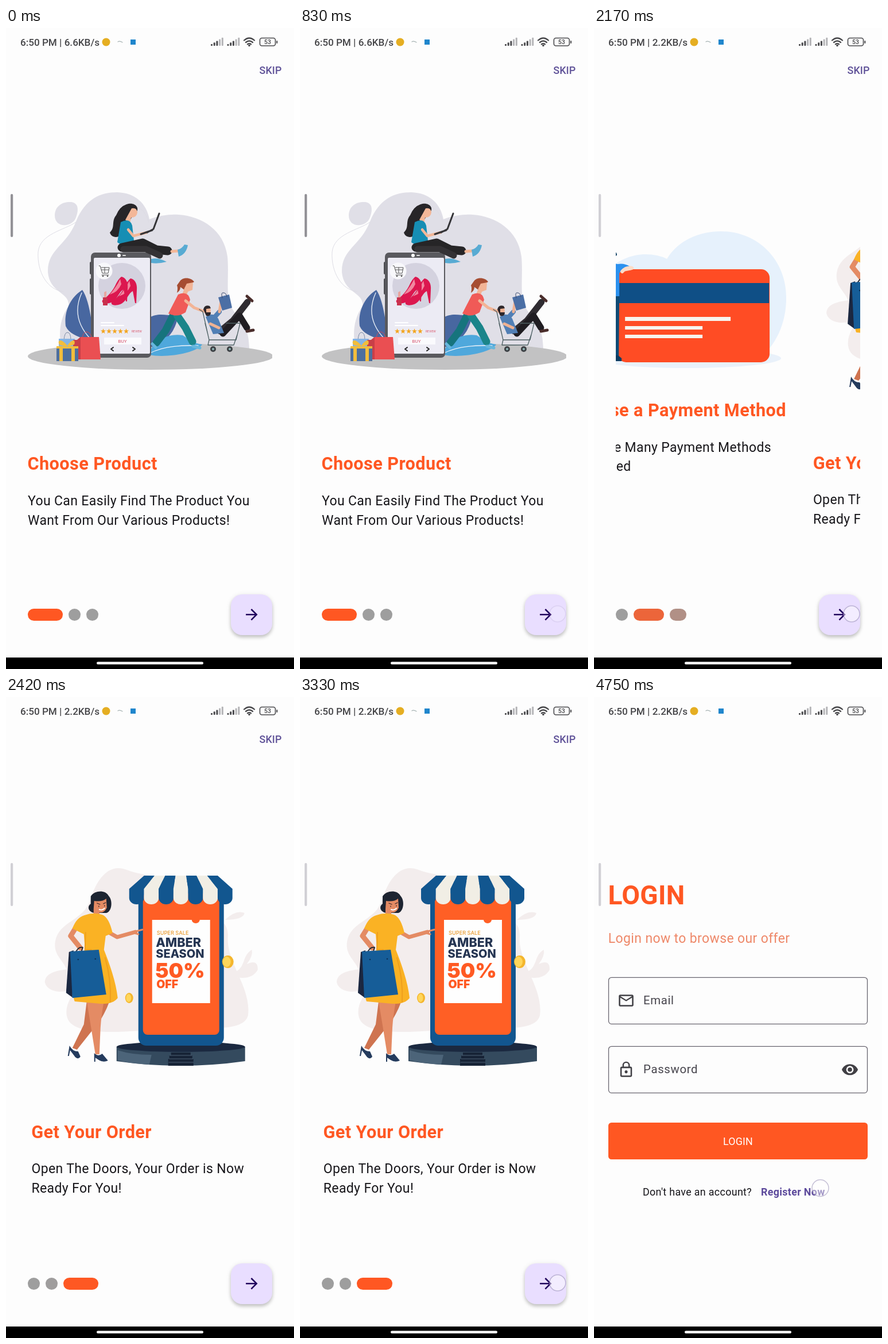
These frames come from a looping animation (502x1116 px, 4.83 s). An HTML page:

```html
<!DOCTYPE html>
<html lang="en">
<head>
<meta charset="utf-8">
<title>Shop onboarding</title>
<style>
  html, body { margin: 0; width: 100%; height: 100%; overflow: hidden; background: #fdfdfd; }
  #stage { position: relative; width: 502px; height: 1116px; overflow: hidden; background: #fdfdfd; }
  .layer, svg.full { position: absolute; left: 0; top: 0; width: 502px; height: 1116px; }
  svg { display: block; font-family: Roboto, sans-serif; }
  .layer, .anim { animation: 4830ms linear infinite; }
  .title { font-size: 30.7px; font-weight: 700; letter-spacing: .4px; fill: #ff5722; }
  .body { font-size: 23px; letter-spacing: .36px; fill: #17161a; }
  .small { font-size: 17.9px; }
  .label { font-size: 20.4px; letter-spacing: .64px; fill: #47454d; }
  .line { fill: none; stroke-linecap: round; stroke-linejoin: round; }
  .poster { font-family: Inter, sans-serif; font-weight: 800; fill: #253552; }

  #track { animation-name: slide; animation-timing-function: ease-in-out; }
  @keyframes slide {
    0%, 18.63% { transform: translateX(0); }
    26.92%, 42.4% { transform: translateX(-425px); }
    50.68%, 100% { transform: translateX(-850px); }
  }
  #dots { position: absolute; left: 38px; top: 1011px; display: flex; gap: 10.2px; }
  #dots i { width: 20.5px; height: 20.5px; border-radius: 11px; background: #9e9e9e; animation-timing-function: ease-in-out; }
  #dots i:nth-child(1) { animation-name: dot1; }
  #dots i:nth-child(2) { animation-name: dot2; }
  #dots i:nth-child(3) { animation-name: dot3; }
  @keyframes dot1 {
    0%, 18.63% { width: 61.3px; background: #ff5722; }
    26.92%, 100% { width: 20.5px; background: #9e9e9e; }
  }
  @keyframes dot2 {
    0%, 18.63%, 50.68%, 100% { width: 20.5px; background: #9e9e9e; }
    26.92%, 42.4% { width: 61.3px; background: #ff5722; }
  }
  @keyframes dot3 {
    0%, 42.4% { width: 20.5px; background: #9e9e9e; }
    50.68%, 100% { width: 61.3px; background: #ff5722; }
  }
  #fab { position: absolute; left: 392px; top: 986px; width: 72px; height: 71px; border-radius: 20px;
    background: #e9deff; box-shadow: 0 4px 6px rgba(0,0,0,.2), 0 1px 10px rgba(0,0,0,.09); }
  #fab svg { position: absolute; left: 20.5px; top: 20px; width: 30.7px; height: 30.7px; fill: #21005d; }

  #intro { animation-name: leave; }
  @keyframes leave {
    0%, 69.15% { transform: scale(1); visibility: visible; animation-timing-function: ease-out; }
    75.36% { transform: scale(1.05); visibility: visible; }
    75.4%, 100% { transform: scale(1.05); visibility: hidden; }
  }
  #login { animation-name: enter; background: #fdfdfd; }
  @keyframes enter {
    0%, 69.15% { opacity: 0; transform: scale(.85); animation-timing-function: ease-out; }
    70.7% { opacity: 1; transform: scale(.92); animation-timing-function: ease-out; }
    75.36%, 100% { opacity: 1; transform: scale(1); }
  }
  #fast { animation-name: early; }
  #slow { animation-name: late; }
  @keyframes early { 0%, 37.8% { opacity: 1; } 37.81%, 100% { opacity: 0; } }
  @keyframes late { 0%, 37.8% { opacity: 0; } 37.81%, 100% { opacity: 1; } }
  #handle { animation-name: dim; }
  @keyframes dim { 0%, 35.2% { fill: #939297; } 39.3%, 100% { fill: #d1d0d5; } }

  .touch circle { fill: rgba(255,255,255,.45); stroke: rgba(150,140,180,.55); stroke-width: 1.5; }
  #tap { animation-name: tap; }
  @keyframes tap {
    0%, 16.36% { opacity: 0; }
    17.18% { opacity: .3; }
    18.22%, 19.46% { opacity: 1; }
    21.95%, 41.2% { opacity: 0; }
    41.6%, 45.13% { opacity: 1; }
    47.2%, 66.25% { opacity: 0; }
    66.67%, 69.98% { opacity: 1; }
    72.05%, 100% { opacity: 0; }
  }
  #tapLast { animation-name: tapLast; }
  @keyframes tapLast { 0%, 98.2% { opacity: 0; } 98.21%, 100% { opacity: 1; } }
</style>
</head>
<body>
<div id="stage">
  <div class="layer" id="intro">
    <svg class="full" viewBox="0 0 502 1116">
      <clipPath id="view"><rect x="38" y="90" width="426" height="890"/></clipPath>
      <text class="small" x="441.5" y="79.5" font-weight="500" fill="#5f5298" letter-spacing=".13">SKIP</text>
      <g clip-path="url(#view)"><g id="track" class="anim">

        <!-- choose product -->
        <g>
          <g fill="#e0dfe7">
            <path d="M73 425C72 385 105 380 122 337C138 297 165 286 194 286C225 287 245 305 250 333C268 326 287 324 301 325C342 328 380 352 386 398C389 430 383 462 391 483C402 504 421 515 423 545L425 570H100C91 540 91 510 109 484C112 460 76 462 73 425Z"/>
            <path d="M85 325C86 309 99 302 114 303C127 305 127 318 121 332C114 347 84 349 85 325Z"/>
          </g>
          <path class="line" stroke="#dddce4" d="M122 338C102 352 59 358 56 390C54 425 72 456 100 459M222 309Q243 314 249 338"/>
          <ellipse cx="252" cy="571.5" rx="214" ry="23.5" fill="#c2c2c3"/>
          <path fill="#4867a0" d="M133 456C111 470 101 495 104 519C111 535 130 538 149 546V510Q143 470 133 456ZM249 505C265 494 282 502 300 500C296 530 275 552 249 556Z"/>
          <path fill="#4fa8dc" d="M249 569C255 543 284 531 308 535C317 540 320 547 342 551C332 566 280 575 249 569Z"/>
          <path class="line" stroke="#eef3fa" stroke-width="1.3" d="M132 461Q112 505 148 542M251 552Q274 532 290 506M251 566Q280 551 335 553"/>

          <!-- phone -->
          <rect x="146" y="407" width="5" height="22" rx="2" fill="#4b4b50"/>
          <rect x="146" y="436" width="5" height="28" rx="2" fill="#4b4b50"/>
          <rect x="148" y="391" width="105" height="183" rx="7" fill="#59595e"/>
          <rect x="153" y="400" width="98" height="167" rx="2" fill="#ecebf4"/>
          <circle cx="197" cy="396" r="3" fill="#fff"/>
          <path class="line" stroke="#ddd" stroke-width="2" d="M204 396H208"/>
          <ellipse cx="202" cy="449" rx="41" ry="40" fill="#d4d2df"/>
          <circle cx="171" cy="423" r="14.5" fill="#f8f8fb"/>
          <path class="line" stroke="#555" d="M162 414H164L168 427H178L180 417H166M166 421H179M172 417V426M167 430H179"/>
          <g fill="#555"><circle cx="169" cy="432" r="1.3"/><circle cx="177" cy="432" r="1.3"/></g>
          <g id="shoe">
            <path fill="#dc174f" d="M217 436C225 437 229 446 228 456L227 479H225L221 458C213 462 209 478 199 481C190 484 182 483 184 477C192 472 203 460 208 448Q212 440 217 436Z"/>
            <path fill="#f1879f" d="M215 440Q209 453 197 467Q211 463 217 449Z"/>
          </g>
          <use href="#shoe" x="-16" y="-3"/>
          <path fill="#e9a6a0" d="M171 460L175 458V470H171Z"/>
          <path fill="#c9314d" d="M169 469H177V483H169Z"/>
          <path class="line" stroke="#fff" stroke-width="2" d="M166 513H188M166 518H205"/>
          <g id="stars" fill="#f3a51f"></g>
          <text x="219" y="530" font-size="5" fill="#d9566b">REVIEW</text>
          <rect x="171" y="539" width="65" height="12" fill="#fafafd"/>
          <text x="203" y="548" font-size="8" fill="#d64f68" text-anchor="middle">BUY</text>
          <path class="line" stroke="#222" stroke-width="2" d="M187 556L183 559L187 562M221 556L225 559L221 562"/>

          <!-- bags -->
          <path class="line" stroke="#7b8aa6" d="M101 543Q102 530 107 530Q113 530 113 543"/>
          <path class="line" stroke="#d44a50" d="M132 544Q134 528 141 529Q149 530 150 544"/>
          <path fill="#86b4e4" d="M92 541H120V560H92Z"/>
          <path fill="#ea4f52" d="M130 538H162L165 577H124V543Z"/>
          <path fill="#c93f48" d="M124 543L130 538V577H117V543Z"/>
          <path fill="#4d6f9e" d="M88 555H126V580H88Z"/>
          <path fill="#f2bd3c" d="M93 557H99V580H93ZM114 557H120V580H114ZM88 554H126V558H88ZM107 553C94 537 88 546 94 552L107 555L119 551C122 542 115 541 107 553Z"/>

          <!-- reader with laptop -->
          <path fill="#272528" d="M210 307C224 302 234 313 227 321C214 332 211 350 201 360C193 367 183 364 181 356C191 347 183 337 192 326Q198 311 210 307Z"/>
          <path fill="#f3b798" d="M219 314Q228 312 229 321Q228 330 218 330L216 340L208 334Z"/>
          <path fill="#168eb4" d="M200 338Q216 330 220 344L223 370Q205 382 194 373Z"/>
          <path class="line" stroke="#f3b798" stroke-width="4.5" d="M213 351L222 362L245 356"/>
          <path class="line" stroke="#343437" stroke-width="3" d="M246 356L257 350L267 323M235 359L255 352"/>
          <path class="line" stroke="#262527" stroke-width="15" d="M202 382L238 374L262 386L282 388"/>
          <path class="line" stroke="#343235" stroke-width="11" d="M205 385H244L268 396"/>
          <path class="line" stroke="#f3b798" stroke-width="5" d="M289 389L301 388"/>
          <path fill="#58abd3" d="M299 386Q307 384 311 377L317 378Q314 394 301 398ZM253 402Q265 399 280 407Q265 411 253 409Z"/>

          <!-- cart pusher -->
          <path fill="#a64d32" d="M303 441C308 433 323 434 328 442L316 448L311 456L304 451Q304 457 298 461Q300 453 298 448Z"/>
          <path fill="#f2b496" d="M315 445L326 443L325 456L317 459L314 468L307 464L311 453Z"/>
          <path class="line" stroke="#16747d" stroke-width="13" d="M292 499L278 527L262 548"/>
          <path class="line" stroke="#1b858a" stroke-width="13" d="M298 500L313 522L325 546"/>
          <path fill="#f05a57" d="M300 464Q317 457 321 473L313 495Q298 505 283 497Z"/>
          <path class="line" stroke="#f2b496" stroke-width="5" d="M313 475L328 487L344 493"/>
          <path class="line" stroke="#67b7dc" stroke-width="5" d="M255 550L261 556M326 554L338 557"/>

          <!-- cart rider -->
          <path class="line" stroke="#2f2c31" stroke-width="11" d="M373 528L396 509L421 477"/>
          <path class="line" stroke="#1f1d22" stroke-width="11" d="M378 532L407 501L420 522"/>
          <path class="line" stroke="#4a2d2b" stroke-width="5" d="M420 467L429 475M420 528L431 526"/>
          <path fill="#517fb5" d="M348 503Q361 493 370 506L380 531L361 533Z"/>
          <path class="line" stroke="#517fb5" stroke-width="8" d="M363 504L372 494"/>
          <path class="line" stroke="#efb293" stroke-width="5" d="M372 494L376 470M356 515L371 522"/>
          <ellipse cx="351" cy="492" rx="6" ry="7" fill="#efb293"/>
          <path fill="#2d272b" d="M344 490Q346 481 355 484L357 488L349 489L349 495L357 495Q357 503 349 501Z"/>
          <path fill="#4b6fa5" d="M370 469L389 464L394 487L377 492Z"/>
          <path class="line" stroke="#3b4c70" d="M377 470Q374 460 379 461Q384 461 385 468"/>
          <path class="line" stroke="#4c5f62" stroke-width="1.3" d="M337 490L343 494L354 543H401L408 514H384M347 514L352 534M354 543L352 552H397M403 534L397 552"/>
          <g fill="#3d4145"><circle cx="361" cy="559" r="5"/><circle cx="390" cy="559" r="5"/></g>
          <g fill="#8fb5b5"><circle cx="361" cy="559" r="2"/><circle cx="390" cy="559" r="2"/></g>

          <text class="title" x="37.5" y="769">Choose Product</text>
          <text class="body" x="38" y="831">You Can Easily Find The Product You</text>
          <text class="body" x="38" y="864.5">Want From Our Various Products!</text>
        </g>

        <!-- payment -->
        <g transform="translate(425)">
          <ellipse cx="246" cy="575" rx="164" ry="17" fill="#e9f1fa"/>
          <path fill="#e6f1fc" d="M80 485C80 435 125 394 174 394Q195 394 211 402C230 370 267 354 305 354C371 354 419 405 419 469C419 515 401 552 371 577H112Q80 540 80 485Z"/>
          <rect x="125" y="420" width="265" height="162" rx="15" fill="#ff4c24"/>
          <path fill="#0f4f86" d="M127 444H389V479H127Z"/>
          <path fill="#f7f5ef" d="M138 503H322V510H138ZM138 519H273V525H138ZM138 534H273V540H138Z"/>
          <path class="line" stroke="#fbdcc8" stroke-width="7" d="M90 437L86 450L100 469M132 421L148 418"/>
          <path fill="#0f4a75" d="M96 466H128L127 571H115L112 493L108 571H94Z"/>
          <path fill="#2b91ef" d="M99 413Q111 408 125 411Q137 409 146 415L132 421L128 427V467H99V441L85 437Z"/>
          <path fill="#fbdcc8" d="M106 394H122L120 409Q111 418 106 409Z"/>
          <path class="line" stroke="#fbdcc8" stroke-width="6" d="M133 424Q140 416 150 418"/>
          <path fill="#0d3c61" d="M104 391C109 384 123 386 124 395L120 399L117 395L113 394L109 404Q104 414 100 405Q103 402 100 399Q101 392 104 391ZM93 570H104L110 575V580H92ZM114 570H126L132 575V580H113Z"/>
          <text class="title" x="38.2" y="676">Choose a Payment Method</text>
          <text class="body" x="39" y="737.5">We Have Many Payment Methods</text>
          <text class="body" x="39" y="771">Supported</text>
        </g>

        <!-- order -->
        <g transform="translate(850)">
          <path fill="#f3eded" d="M82 426C88 390 132 390 143 353C154 319 174 288 207 301C242 315 282 306 301 343C322 387 387 371 383 418C380 462 425 507 418 555C409 585 344 574 282 577C202 583 107 594 102 554C99 535 112 520 119 506C91 520 66 511 64 496C65 478 91 476 102 474C94 456 79 449 82 426Z"/>
          <path fill="#f3eded" d="M378 388Q397 370 412 376Q410 388 378 388ZM397 478C414 470 408 449 425 440Q427 451 416 465Q436 456 435 475Q425 493 397 488Z"/>
          <path fill="#344a5e" d="M189 609V634Q300 650 413 634V609Z"/>
          <path fill="#4c6479" d="M191 615Q215 623 250 623L246 640Q210 638 191 632Z"/>
          <ellipse cx="301" cy="609" rx="112" ry="9" fill="#1b2940"/>
          <path fill="#172336" d="M284 619H318V624H321V630H323V642H279V630H281V624H284Z"/>
          <path class="line" stroke="#4c6075" d="M282 624H320M281 630H322M280 636H323"/>
          <rect x="227" y="320" width="149" height="287" rx="14" fill="#12568f"/>
          <rect x="235" y="342" width="133" height="246" rx="8" fill="#ff5f25"/>
          <g id="awning"></g>
          <path fill="#fefefe" d="M251 388H320A7 6 0 0 0 334 388H352V533H251Z"/>
          <text x="259" y="414" font-size="9.2" fill="#e99b2f" font-family="Inter, sans-serif" font-weight="500">SUPER SALE</text>
          <g class="poster">
            <text x="257.5" y="435" font-size="21.6">AMBER</text>
            <text x="257.5" y="454" font-size="20">SEASON</text>
            <g fill="#ff5a23" font-weight="900">
              <text x="256.5" y="489" font-size="36">50%</text>
              <text x="258.5" y="507" font-size="19.5">OFF</text>
            </g>
          </g>
          <g fill="#f4b62d"><ellipse cx="383" cy="461" rx="10" ry="11"/><ellipse cx="211" cy="524" rx="7" ry="9"/></g>
          <g fill="#ffd65b"><ellipse cx="381" cy="461" rx="7" ry="9"/><ellipse cx="210" cy="524" rx="4.5" ry="7"/></g>

          <!-- shopper -->
          <path fill="#cf7450" d="M137 530L177 529Q167 557 151 575L120 614L112 611L132 570Z"/>
          <path fill="#e48b64" d="M137 530H167Q162 557 161 576L159 622H152L144 572Z"/>
          <path fill="#243b5d" d="M107 607Q112 617 122 617L126 626Q123 632 117 627L108 615L106 625H104ZM150 620Q157 627 164 621L174 633Q166 637 158 632L152 628V635H150Z"/>
          <path class="line" stroke="#e48b64" stroke-width="9" d="M117 403L109 416L126 437"/>
          <path class="line" stroke="#e48b64" stroke-width="7" d="M174 409L190 418L222 409"/>
          <path class="line" stroke="#e48b64" stroke-width="3" d="M219 409L234 405M220 411L227 413"/>
          <path fill="#1d2431" d="M144 347C151 336 170 336 175 346C183 354 181 374 171 376H150C140 374 137 365 144 360Z"/>
          <path fill="#e48b64" d="M150 355Q164 357 171 351L172 367Q167 377 159 375V384H149V369Z"/>
          <path class="line" stroke="#39262b" stroke-width="1.3" d="M155 359L160 361M166 360L170 358M158 364V365M168 363V364"/>
          <path class="line" stroke="#fff" stroke-width="2" d="M159 370Q164 372 168 368"/>
          <path fill="#fab224" d="M133 380Q149 374 164 379Q176 384 182 411L170 416L167 440C177 465 188 496 191 524Q183 535 161 534L116 530Q111 520 118 480L134 438L132 413L112 403Q119 384 133 380Z"/>
          <path class="line" stroke="#ef9f1d" stroke-width="2" d="M169 454Q180 492 178 531M135 410L134 440L145 440"/>
          <path class="line" stroke="#2a2c34" stroke-width="2" d="M116 449Q121 434 130 436L126 449"/>
          <path fill="#1b2740" d="M106 444L114 441L112 523L101 515Z"/>
          <path fill="#165d98" d="M108 443L158 440L171 518L112 524Z"/>
          <g fill="#0c3158"><circle cx="122" cy="457" r="1.3"/><circle cx="152" cy="456" r="1.3"/></g>

          <text class="title" x="40.5" y="768">Get Your Order</text>
          <text class="body" x="40.8" y="829">Open The Doors, Your Order is Now</text>
          <text class="body" x="40.8" y="862.5">Ready For You!</text>
        </g>
      </g></g>
    </svg>
    <div id="dots"><i class="anim"></i><i class="anim"></i><i class="anim"></i></div>
    <div id="fab"><svg viewBox="0 0 24 24"><path d="M12 4l-1.41 1.41L16.17 11H4v2h12.17l-5.58 5.59L12 20l8-8z"/></svg></div>
  </div>

  <div class="layer" id="login">
    <svg class="full" viewBox="0 0 502 1116">
      <text x="24.5" y="361" font-size="46" font-weight="700" fill="#ff5722" letter-spacing=".32">LOGIN</text>
      <text class="body" x="24.8" y="428" style="fill:#ee8869">Login now to browse our offer</text>
      <g fill="none" stroke="#68656f" stroke-width="1.3">
        <rect x="25.5" y="488.3" width="451" height="81" rx="5"/>
        <rect x="25.5" y="608.3" width="451" height="81" rx="5"/>
      </g>
      <text class="label" x="86" y="535">Email</text>
      <text class="label" x="86" y="655">Password</text>
      <g fill="#414045" fill-rule="evenodd">
        <path transform="translate(40.7 513.2) scale(1.278)" d="M22 6c0-1.1-.9-2-2-2H4c-1.1 0-2 .9-2 2v12c0 1.1.9 2 2 2h16c1.1 0 2-.9 2-2V6zm-2 0l-8 5-8-5h16zm0 12H4V8l8 5 8-5v10z"/>
        <path transform="translate(40.7 633.4) scale(1.278)" d="M12 17a2 2 0 1 0 0-4 2 2 0 0 0 0 4zM18 8h-1V6A5 5 0 0 0 7 6v2H6c-1.1 0-2 .9-2 2v10c0 1.1.9 2 2 2h12c1.1 0 2-.9 2-2V10c0-1.1-.9-2-2-2zM8.9 6a3.1 3.1 0 0 1 6.2 0v2H8.9V6zM18 20H6V10h12v10z"/>
        <path transform="translate(430.7 633.4) scale(1.278)" d="M12 4.5C7 4.5 2.73 7.61 1 12c1.73 4.39 6 7.5 11 7.5s9.27-3.11 11-7.5c-1.73-4.39-6-7.5-11-7.5zM12 17a5 5 0 1 1 0-10 5 5 0 0 1 0 10zM12 9a3 3 0 1 0 0 6 3 3 0 0 0 0-6z"/>
      </g>
      <rect x="25" y="741" width="452" height="64" rx="5.5" fill="#ff5722"/>
      <text class="small" x="251" y="779.5" fill="#fff" text-anchor="middle" letter-spacing=".13">LOGIN</text>
      <g class="small" letter-spacing=".32">
        <text x="85" y="867.5" fill="#151419">Don't have an account?</text>
        <text x="291" y="867.5" font-weight="700" fill="#5d4a9c">Register Now</text>
      </g>
    </svg>
  </div>

  <svg class="full" viewBox="0 0 502 1116">
    <g font-size="17.1" font-weight="500" fill="#454548">
      <text id="fast" class="anim" x="25" y="31">6:50 PM | 6.6KB/s</text>
      <text id="slow" class="anim" x="25" y="31">6:50 PM | 2.2KB/s</text>
    </g>
    <circle cx="174.5" cy="24.5" r="7" fill="#e5ae22"/>
    <path class="line" stroke="#a8b4b4" stroke-width="1.3" d="M195 24Q198 22 203 25"/>
    <rect x="217" y="20" width="9" height="9" fill="#1f86cc"/>
    <g id="signal"></g>
    <g class="line" stroke="#48484b" stroke-width="2.3">
      <path d="M415 21.5Q424 13.5 433 21.5M418 25Q424 20 430 25M421 28.2Q424 26 427 28.2"/>
      <rect x="442.5" y="17.5" width="27" height="13.5" rx="3.5" stroke-width="1.6"/>
      <path stroke-width="2" d="M472.3 23V26"/>
    </g>
    <circle cx="424" cy="30.5" r="1.8" fill="#48484b"/>
    <text x="456" y="28.2" font-size="10.5" font-weight="500" fill="#454548" text-anchor="middle">53</text>
    <rect id="handle" class="anim" x="8" y="289" width="4.2" height="75" rx="2"/>
    <rect y="1096" width="502" height="20"/>
    <rect x="158" y="1103.5" width="186" height="4.5" rx="2.2" fill="#fff"/>
    <g class="touch">
      <circle id="tap" class="anim" cx="449" cy="1020" r="14"/>
      <circle id="tapLast" class="anim" cx="394.5" cy="855" r="14.5"/>
    </g>
  </svg>
</div>
<script>
  const fill = (id, count, draw) => {
    document.getElementById(id).innerHTML = Array.from({ length: count }, (_, i) => draw(i)).join('');
  };

  const star = cx => Array.from({ length: 10 }, (_, k) => {
    const r = k % 2 ? 2 : 4.8, a = k * Math.PI / 5;
    return (cx + r * Math.sin(a)).toFixed(1) + ',' + (528 - r * Math.cos(a)).toFixed(1);
  }).join(' ');
  fill('stars', 5, i => `<polygon points="${star(169.5 + i * 10)}"/>`);

  // Each stripe widens towards a scalloped lower edge.
  fill('awning', 7, i => {
    const top = 237 + i * 18.3, low = 211 + i * 25.7;
    return `<path fill="${i % 2 ? '#f1eee5' : '#12568f'}" d="M${top} 311h18.4L${low + 25.8} 334V350a12.9 11 0 0 1-25.8 0V334Z"/>`;
  });

  fill('signal', 10, i => {
    const n = i % 5, h = 3 + n * 2.8, x = (i < 5 ? 357 : 385.5) + n * 4.7;
    return `<rect x="${x}" y="${31 - h}" width="3" height="${h}" rx="1" fill="${n < 3 ? '#4a4a4d' : '#b4b4b7'}"/>`;
  });
</script>
</body>
</html>
```
